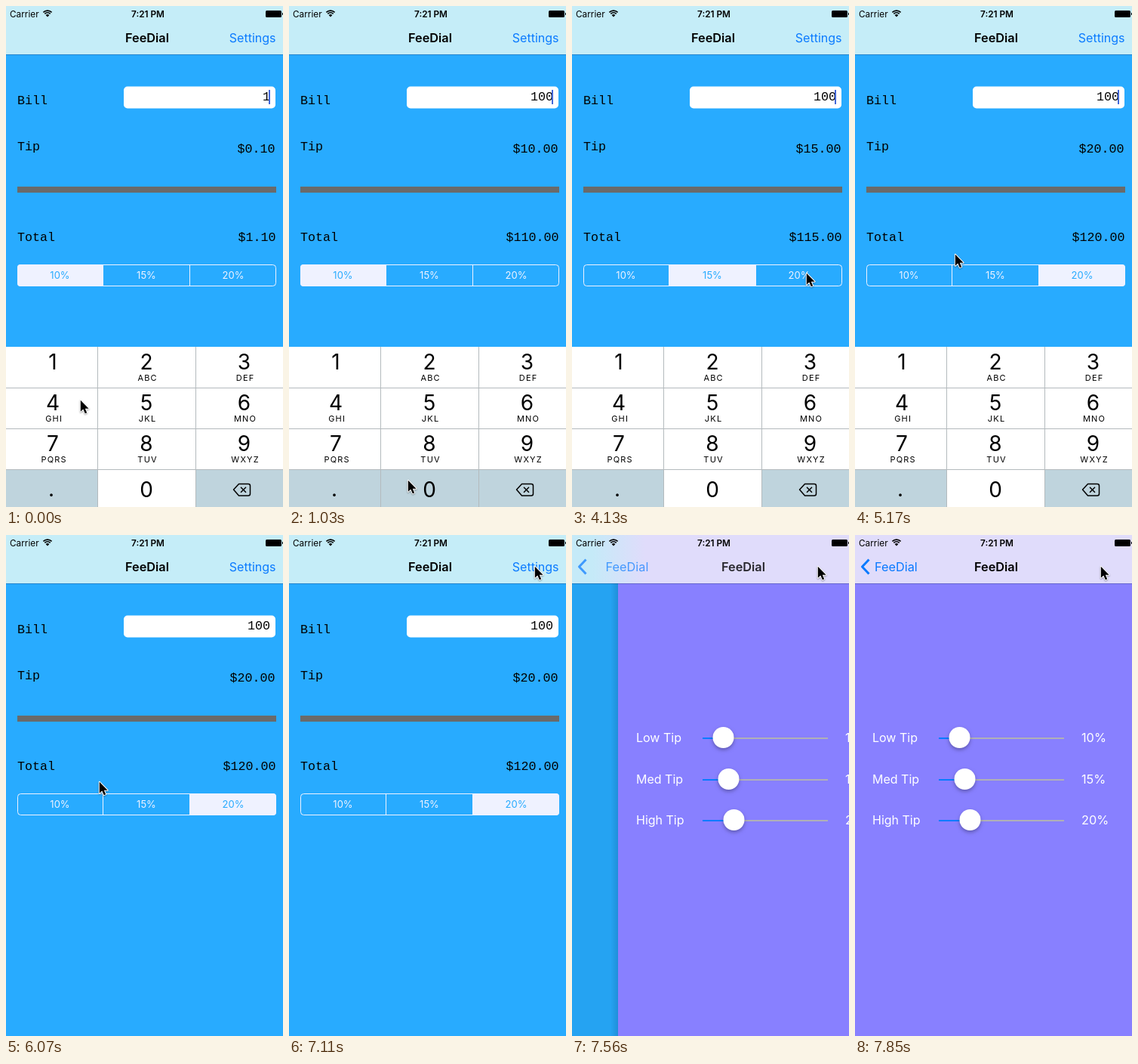
Animation, 367 px wide and 663 px high, one loop 8000 ms. Source, as an HTML page with a canvas:

```html
<!DOCTYPE html>
<html lang="en">
<head>
<meta charset="utf-8">
<title>Tip calculator</title>
<style>
html, body { margin: 0; width: 100%; height: 100%; overflow: hidden; background: #28abff; }
canvas { display: block; width: 367px; height: 663px; }
</style>
</head>
<body>
<canvas id="stage"></canvas>
<script>
const W = 367, H = 663, LOOP = 8000, STEPS = 54;
const NAME = 'FeeDial';
const BLUE = '#28abff', PURPLE = '#8880ff', LINK = '#0a7aff', PALE = '#eff2ff', KEY = '#bfd4dd';
const SANS = 'Inter, "Open Sans", sans-serif';
const MONO = '"Liberation Mono", "Courier New", monospace';

const canvas = document.getElementById('stage');
const ctx = canvas.getContext('2d');
const dpr = window.devicePixelRatio || 1;
canvas.width = W * dpr;
canvas.height = H * dpr;

// Pointer stops: step, x, y
const PATH = [
  [0, 98, 521], [1, 112, 556], [2, 145, 610], [3, 157, 627],
  [9, 157, 627], [10, 154, 612], [11, 146, 562], [13, 131, 450], [14, 134, 410],
  [15, 145, 380], [16, 158, 362], [17, 166, 358],
  [23, 166, 358], [24, 180, 359], [25, 215, 358], [26, 258, 356], [27, 292, 354], [28, 310, 353],
  [31, 310, 353], [32, 285, 350], [33, 225, 341], [34, 165, 332], [35, 132, 328],
  [36, 132, 328], [37, 122, 326], [40, 122, 326], [41, 123, 326], [42, 175, 200], [43, 239, 84],
  [44, 239, 84], [45, 265, 62], [46, 318, 32], [47, 338, 26], [48, 325, 41], [54, 325, 41]
];

function pointerAt(step) {
  const i = PATH.findIndex(p => p[0] > step);
  const [s0, x0, y0] = PATH[i - 1], [s1, x1, y1] = PATH[i];
  const u = (step - s0) / (s1 - s0);
  return [x0 + (x1 - x0) * u, y0 + (y1 - y0) * u];
}

function caretAt(step) {
  if (step < 3) return 1;
  if (step < 5 || step > 36) return 0;
  if (step < 12 || step === 36) return 1;
  return [0.25, 0, 0.4, 1, 1, 1][step % 6];
}

function rect(x, y, w, h, fill) {
  ctx.fillStyle = fill;
  ctx.fillRect(x, y, w, h);
}

function round(x, y, w, h, r) {
  ctx.beginPath();
  ctx.roundRect(x, y, w, h, r);
}

function text(str, x, y, font, color = '#000', align = 'left') {
  ctx.font = font;
  ctx.fillStyle = color;
  ctx.textAlign = align;
  ctx.fillText(str, x, y);
}

function lines(points, close) {
  ctx.beginPath();
  points.forEach(([x, y], i) => i ? ctx.lineTo(x, y) : ctx.moveTo(x, y));
  if (close) ctx.closePath();
}

function faded(alpha, draw) {
  ctx.save();
  ctx.globalAlpha = alpha;
  draw();
  ctx.restore();
}

function statusBar() {
  text('Carrier', 5, 14.5, `11.8px ${SANS}`);
  text('7:21 PM', 188, 14.5, `600 11.8px ${SANS}`, '#000', 'center');
  ctx.strokeStyle = '#000';
  ctx.lineWidth = 1.6;
  for (const r of [7.9, 5.2]) {
    ctx.beginPath();
    ctx.arc(55, 14, r, -Math.PI * 0.75, -Math.PI * 0.25);
    ctx.stroke();
  }
  ctx.fillStyle = '#000';
  ctx.beginPath();
  ctx.moveTo(55, 14.5);
  ctx.arc(55, 14.5, 3.4, -Math.PI * 0.75, -Math.PI * 0.25);
  ctx.fill();
  round(344, 6, 21, 9, 1.5);
  ctx.fill();
  rect(366, 9, 1, 3, '#000');
}

function navBar(fill) {
  rect(0, 0, W, 64, fill);
  rect(0, 64, W, 1, 'rgba(20,40,90,.3)');
}

function title(x) {
  text(NAME, x, 48, `600 16.3px ${SANS}`, '#000', 'center');
}

function chevron() {
  lines([[18.5, 32.5], [9.5, 42], [18.5, 51.5]]);
  ctx.strokeStyle = LINK;
  ctx.lineWidth = 3;
  ctx.stroke();
}

function segments(selected) {
  const edges = [15, 128.5, 243.5, 358];
  ctx.save();
  round(15, 342, 343, 29, 4);
  ctx.clip();
  rect(edges[selected], 342, edges[selected + 1] - edges[selected], 29, PALE);
  ctx.restore();
  rect(128, 342, 1, 29, PALE);
  rect(243, 342, 1, 29, PALE);
  round(15.5, 342.5, 342, 28, 4);
  ctx.strokeStyle = PALE;
  ctx.lineWidth = 1;
  ctx.stroke();
  ['10%', '15%', '20%'].forEach((label, i) =>
    text(label, [71.5, 186, 301][i], 361, `13px ${SANS}`, i === selected ? BLUE : PALE, 'center'));
}

function keypad(pressed) {
  rect(0, 451, W, 212, '#fff');
  rect(0, 614, 121, 49, KEY);
  rect(252, 614, 115, 49, KEY);
  if (pressed) rect(122, 614, 129, 49, KEY);
  for (const y of [505, 559, 613]) rect(0, y, W, 1, '#b4babd');
  for (const x of [121, 251]) rect(x, 451, 1, 212, '#b4babd');

  const letters = ['', 'ABC', 'DEF', 'GHI', 'JKL', 'MNO', 'PQRS', 'TUV', 'WXYZ'];
  const digit = `28px ${SANS}`;
  letters.forEach((label, i) => {
    const x = [62, 186, 315.5][i % 3], y = 481 + 54 * Math.floor(i / 3);
    text(String(i + 1), x, y, digit, '#000', 'center');
    ctx.letterSpacing = '1.2px';
    text(label, x + 1.6, y + 15, `11px ${SANS}`, '#000', 'center');
    ctx.letterSpacing = '0px';
  });
  text('.', 60, 649, digit, '#000', 'center');
  text('0', 186, 650, digit, '#000', 'center');

  ctx.strokeStyle = '#000';
  ctx.lineWidth = 1.5;
  ctx.lineJoin = 'round';
  ctx.beginPath();
  ctx.moveTo(301.5, 640);
  ctx.lineTo(308.5, 632.5);
  ctx.arcTo(323.5, 632.5, 323.5, 640, 2.5);
  ctx.arcTo(323.5, 648, 310, 648, 2.5);
  ctx.lineTo(308.5, 648);
  ctx.closePath();
  ctx.stroke();
  for (const s of [-1, 1]) {
    lines([[311, 640.2 - 3.5 * s], [318, 640.2 + 3.5 * s]]);
    ctx.stroke();
  }
}

function calculator(step) {
  const bill = step < 5 ? 1 : step < 7 ? 10 : 100;
  const choice = step < 19 ? 0 : step < 31 ? 1 : 2;
  const tip = bill * [0.10, 0.15, 0.20][choice];
  const mono = `16.67px ${MONO}`;

  rect(0, 0, W, H, BLUE);
  navBar('#c5edf8');
  title(187);
  text('Settings', 357.5, 48, `16px ${SANS}`, LINK, 'right');

  text('Bill', 15, 130, mono);
  text('Tip', 15, 191, mono);
  text('Total', 15, 311, mono);
  round(156, 106.5, 201, 29, 5);
  ctx.fillStyle = '#fff';
  ctx.fill();
  text(String(bill), 350, 125, mono, '#000', 'right');
  faded(caretAt(step), () => rect(348, 111, 2, 19, '#4268d8'));
  text('$' + tip.toFixed(2), 356.5, 194, mono, '#000', 'right');
  text('$' + (bill + tip).toFixed(2), 357.5, 311, mono, '#000', 'right');
  rect(15, 239, 343, 8, '#6a6a6a');

  segments(choice);
  if (step < 37) keypad(step === 7);
}

function slider(label, percent, y, knob) {
  text(label, 23, y + 6, `16px ${SANS}`, '#fff');
  text(percent, 300, y + 6, `16.3px ${SANS}`, '#fff');
  rect(111, y, 166, 2, '#b0b0b6');
  rect(111, y, knob - 111, 2, '#087cff');
  ctx.save();
  ctx.shadowColor = 'rgba(0,0,0,.3)';
  ctx.shadowBlur = 5 * dpr;
  ctx.shadowOffsetY = 2.5 * dpr;
  ctx.fillStyle = '#fff';
  ctx.beginPath();
  ctx.arc(knob, y, 14, 0, Math.PI * 2);
  ctx.fill();
  ctx.restore();
}

function settings(step) {
  const dx = [214, 62, 14, 0][step - 50];
  const done = 1 - dx / W;

  rect(0, 0, W, H, '#25a3f2');
  if (dx) {
    const shade = ctx.createLinearGradient(dx - 11, 0, dx - 1, 0);
    shade.addColorStop(0, 'rgba(0,40,90,0)');
    shade.addColorStop(1, 'rgba(0,40,90,.16)');
    rect(dx - 11, 64, 10, H, shade);
  }
  ctx.save();
  ctx.translate(dx, 0);
  rect(-1, 64, W + 1, H, PURPLE);
  slider('Low Tip', '10%', 268, 138.5);
  slider('Med Tip', '15%', 323, 145.5);
  slider('High Tip', '20%', 377, 152.5);
  ctx.restore();

  let fill = '#e0dcfb';
  if (dx) {
    fill = ctx.createLinearGradient(dx - 35, 0, dx + 35, 0);
    fill.addColorStop(0, '#c5eaf8');
    fill.addColorStop(1, '#e0dcfb');
  }
  navBar(fill);

  const back = Math.max(0, (done - 0.42) / 0.58);
  faded(Math.max(0, 0.36 - back), () => title(187 - 114 * done));
  faded(0.4 + 0.6 * back, () => title(187 + dx * 0.645));
  faded(0.03 + 0.97 * back, chevron);
  faded(back, () => text(NAME, 26 + dx * 0.3, 48, `16.3px ${SANS}`, LINK));
}

function pointer(x, y) {
  ctx.save();
  ctx.translate(x + 0.8, y + 0.8);
  ctx.shadowColor = 'rgba(0,0,0,.35)';
  ctx.shadowBlur = 2 * dpr;
  ctx.shadowOffsetY = dpr;
  lines([[0, 0], [0, 15], [3.5, 11.8], [6, 17.4], [8.4, 16.4], [6, 11], [10.8, 11]], true);
  ctx.lineJoin = 'round';
  ctx.lineWidth = 2;
  ctx.strokeStyle = '#fff';
  ctx.stroke();
  ctx.shadowColor = 'transparent';
  ctx.fillStyle = '#000';
  ctx.fill();
  ctx.restore();
}

function draw(now) {
  const t = now % LOOP;
  const step = Math.min(STEPS - 1, Math.floor((t + 20) * STEPS / LOOP));
  ctx.setTransform(dpr, 0, 0, dpr, 0, 0);
  if (step < 50) calculator(step);
  else settings(step);
  statusBar();
  pointer(...pointerAt(step));
}

const start = performance.now();
function tick() {
  draw(performance.now() - start);
  requestAnimationFrame(tick);
}
tick();
</script>
</body>
</html>
```
